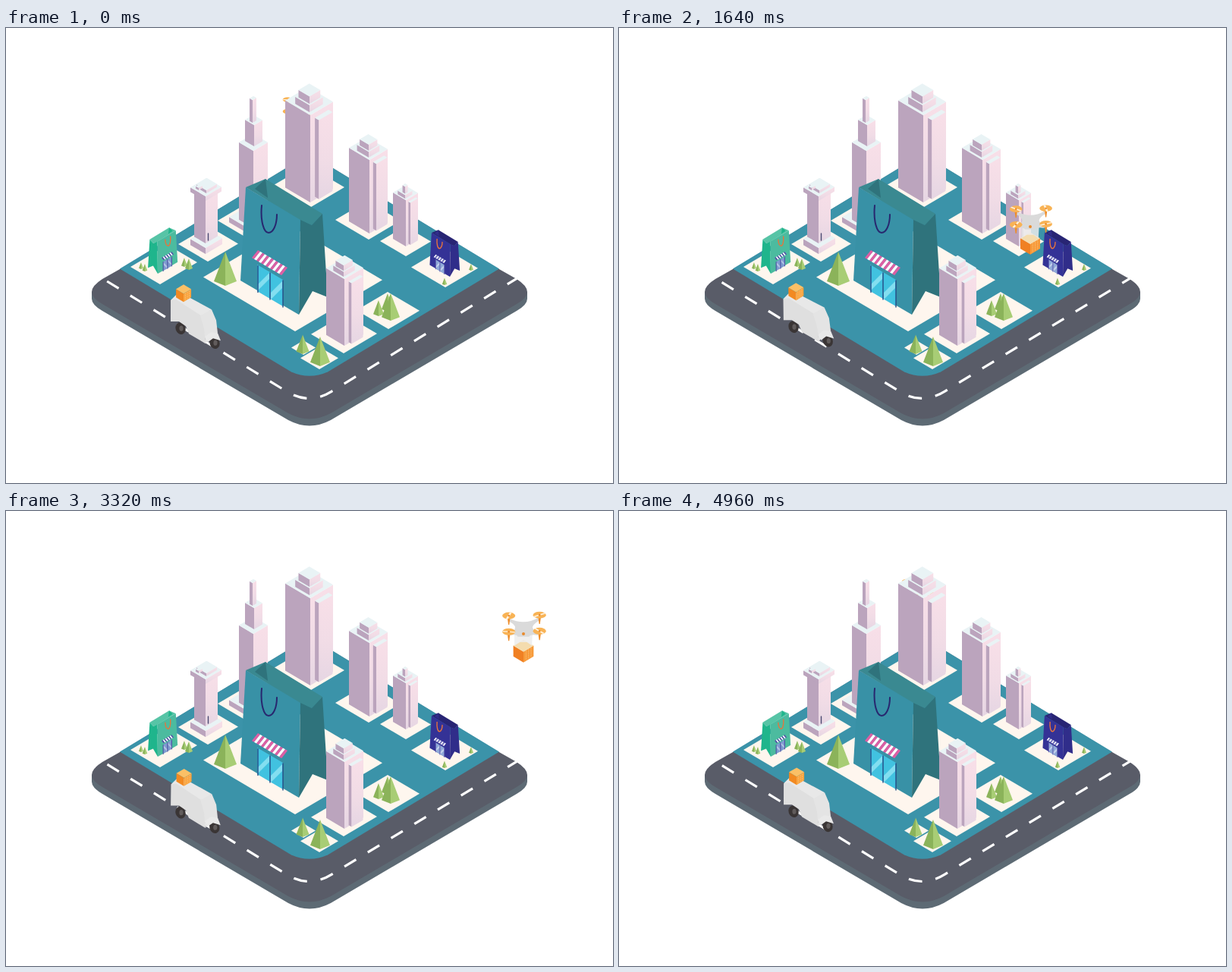
An HTML page for the animation above (5 s loop, 800 by 600 pixels).

```html
<!DOCTYPE html>
<html lang="en">
<head>
<meta charset="utf-8">
<title>Isometric city delivery</title>
<style>
  html, body { margin: 0; width: 100%; height: 100%; overflow: hidden; background: #fff; }
  svg { display: block; width: 100vw; height: 100vh; }
</style>
</head>
<body>
<svg id="stage" viewBox="0 0 800 600" xmlns="http://www.w3.org/2000/svg"></svg>
<script>
const LOOP = 5000, STEP = 40, SLOPE = 0.59, TURN = 2 * Math.PI;
const WALL = ['#e9f3f5', '#bba4bd', 'url(#wall)'];
const PARCEL = ['#fbc066', '#f28a22', '#f9a33d'];

const poly = (pts, fill) => `<polygon points="${pts}" fill="${fill}"/>`;
const line = (d, stroke, w) =>
  `<path d="${d}" fill="none" stroke="${stroke}" stroke-width="${w}" stroke-linecap="round"/>`;
const group = (id, ...parts) => `<g id="${id}">${parts.join('')}</g>`;

// Flat diamond; (x, y) is its front corner, l and r its reach to each side.
const diamond = (x, y, l, r, fill) => poly(
  `${x},${y} ${x - l},${y - l * SLOPE} ${x + r - l},${y - (l + r) * SLOPE} ${x + r},${y - r * SLOPE}`, fill);
const plot = (x, y, l, r) => diamond(x, y, l, r, '#fef6ee');

// Upright panel running from (x, y) to the side by w.
const panel = (x, y, w, h, fill) => poly(
  `${x},${y} ${x + w},${y - Math.abs(w) * SLOPE} ${x + w},${y - Math.abs(w) * SLOPE + h} ${x},${y + h}`, fill);

// Prism; (x, y) is the front corner of its top.
const box = (x, y, l, r, h, [top, left, right] = WALL) =>
  panel(x, y, -l, h, left) + panel(x, y, r, h, right) + diamond(x, y, l, r, top);

// Stepped tower with a raised fin on the right face.
function skyscraper(x, y, l, r, h, tip = 0.44) {
  const lift = 1.3 - 1.25 * tip;
  return box(x, y, l, r, h) +
    box(x - 1, y - 0.4 * l, 0.57 * l, 0.59 * r, 0.28 * l) +
    box(x - 1, y - lift * l, tip * l, tip * 1.08 * r, (lift - 0.4) * l * 0.85) +
    box(x + 0.38 * r, y + 0.22 * r, 0.16 * l, 0.6 * r, h - 0.33 * l);
}

function parcel(x, y, size, colors = PARCEL) {
  let out = box(x, y, size, size, size + 1, colors);
  for (let k = 0.25; k < 1; k += 0.25) {
    const px = x + k * size, py = y - k * size * SLOPE + 1;
    out += `<path d="M${px},${py}v${size - 1}" stroke="#fdc57c" stroke-width=".9" stroke-dasharray="1.6 1"/>`;
  }
  return out;
}

function tree(x, y, w) {
  const apex = `${x},${y - 3 * w}`, low = y - 0.4 * w;
  return poly(`${apex} ${x - w},${low} ${x},${y}`, '#8bb35a') +
    poly(`${apex} ${x},${y} ${x + w},${low}`, '#a8cd75');
}

// Awning of slanted stripes.
function awning(x, y, n, colors) {
  let out = '';
  for (let i = 0; i < n; i++) {
    const dx = 39 / n, dy = dx * SLOPE, ax = x + i * dx, ay = y + i * dy;
    const lean = k => `${ax + k * dx * 1.1 - 8},${ay + k * dy + 10}`;
    out += poly(`${ax},${ay} ${ax + dx},${ay + dy} ${lean(1)} ${lean(0.5)} ${lean(0)}`, colors[i % 2]);
  }
  return out;
}

// Shopping bag shop; (x, y) is its front bottom corner, a negative sx mirrors it.
function bag(x, y, sx, c) {
  const post = px => `M${px},${-65 + (px + 55) * SLOPE}v35`;
  return `<g transform="translate(${x} ${y}) scale(${sx} ${Math.abs(sx)})">` +
    poly('-70,-168 -44,-179 31,-133 17,-118 2,-124', c.inside) +
    poly('-58,-166 -44,-179 -41,-154', c.side) +
    poly('-70,-168 2,-125 0,0 -77,-45', c.front) +
    poly('2,-125 17,-118 31,-133 38,-23 18,-31 0,0', c.side) +
    line('M-49,-144C-51,-123 -46,-108 -40,-108C-34,-108 -29,-118 -29,-132', c.handle, c.stroke) +
    panel(-21, -46, -34, 35, c.glass) +
    poly('-54,-40 -39,-55 -39,-47 -54,-32', c.glare) +
    poly('-37,-29 -22,-44 -22,-35 -37,-20', c.glare) +
    line(post(-54) + post(-38) + post(-21), c.frame, c.stroke * 0.7) +
    awning(-54, -85, c.stripes.n, c.stripes.colors) + '</g>';
}

const defs = `<defs><linearGradient id="wall" x1="0" y1="0" x2="0" y2="1">
  <stop offset="0" stop-color="#f8dfe8"/><stop offset=".55" stop-color="#f1dce6"/><stop offset="1" stop-color="#e6d6e3"/>
</linearGradient></defs>`;

const ground = group('ground',
  `<path d="M113,348v9Q113,365 127,373L372,517Q400,532 428,517L673,373Q687,365 687,357v-9L400,330Z" fill="#5d6a74"/>`,
  `<path d="M150,318L127,331Q113,340 113,348Q113,356 127,364L372,508Q400,523 428,508L673,364Q687,356 687,348Q687,340 673,331L650,318L400,166Z" fill="#595c68"/>`,
  `<path d="M150,317.5L400,166L650,317.5L424,453.5Q400,464 376,453.5Z" fill="#3b93a9"/>`,
  `<path id="lane" d="M126,329.6L370,479.4Q399.5,497.6 429,479.3L676,328.6" fill="none" stroke="#fff" stroke-width="3.2" stroke-dasharray="18 18"/>`,
  plot(203, 338, 39, 49), plot(266, 308, 39, 40), plot(318, 277, 39, 50),
  plot(402, 236, 49, 44), plot(478, 279, 44, 42), plot(527, 301, 34, 33),
  plot(579, 342, 45, 43), plot(381, 400, 121, 115), plot(445, 429, 43, 44),
  plot(504, 397, 42, 41), plot(392, 431, 16, 16), plot(413, 450, 25, 25));

const spire = group('spire',
  box(314, 261, 20, 24, 7), box(326, 162, 19, 19, 102),
  box(327, 128, 12, 11, 28), box(325, 95, 4, 5, 30));

const hall = group('hall',
  box(263, 290, 20, 22, 8), box(263, 222, 15, 16, 62), line('M266.5,271v9', '#4b4a72', 1.4),
  box(263, 222, 20, 21, 6), box(264, 214, 13, 14, 4), box(254, 211, 4, 5, 3));

const tower = group('tower', skyscraper(401, 115, 33, 30, 115));

const blocks = group('blocks',
  skyscraper(479, 174, 27, 24, 97), skyscraper(527, 227, 17, 16, 61, 0.2));

const bags = group('bags',
  bag(386, 378, 1, {
    front: '#3891a6', side: '#2f737c', inside: '#3a8991', handle: '#28276f', stroke: 2,
    glass: '#41c2e0', glare: '#83def0', frame: '#254a85',
    stripes: { n: 13, colors: ['#dc5fa4', '#fff'] }
  }),
  bag(200, 324, -0.34, {
    front: '#4cbb9f', side: '#1fb58c', inside: '#57c4a6', handle: '#e7743c', stroke: 4,
    glass: '#7f9bd0', glare: '#b3c3e4', frame: '#45459a',
    stripes: { n: 9, colors: ['#5553a8', '#fff'] }
  }),
  bag(585, 328, 0.345, {
    front: '#343296', side: '#302d8a', inside: '#282574', handle: '#e7743c', stroke: 4,
    glass: '#8fa9d8', glare: '#c3d0ec', frame: '#5a58ac',
    stripes: { n: 9, colors: ['#fff', '#7a79c0'] }
  }));

const trees = group('trees',
  tree(289, 340, 15), tree(178, 318, 3), tree(183, 321, 3.3), tree(235, 315, 4), tree(241, 319, 5),
  tree(613, 320, 3), tree(578, 339, 3.2), tree(391, 430, 8.5), tree(414, 446, 13),
  tree(491, 380, 7), tree(503, 374, 8), tree(507, 386, 12));

const front = group('front', skyscraper(446, 331, 24, 25, 88));

const wheel = (x, y) =>
  `<ellipse cx="${x}" cy="${y}" rx="6.5" ry="8" transform="rotate(-20 ${x} ${y})" fill="#3a3535"/>` +
  `<ellipse cx="${x + 1}" cy="${y}" rx="2.6" ry="3.6" fill="#615c5c"/>`;
const truck = group('truck',
  wheel(230, 396), wheel(275, 415),
  poly('217,359 224,352 232,350 271,371 258,381', '#e8e8e8'),
  poly('217,359 224,358 257,379 262,396 263,416 241,403 237,393 228,387 217,387', '#dfdfdf'),
  poly('256,379 271,371 277,385 279,402 270,406 263,416 261,396', '#e4e4e4'),
  poly('262,407 270,401 279,402 283,412 273,409 266,414', '#e9e9e9'),
  parcel(234, 350, 10));

const rotor = (x, y) => `<g transform="translate(${x} ${y})">
  <path d="M-2,3L2,3L.6,13L-.6,13Z" fill="#ee8d2a"/>
  <g transform="scale(1 .52)"><circle r="9.3" fill="#f8b355"/>
  <path class="blade" d="M-9,0H9" stroke="#fff3e0" stroke-width="3"/></g>
  <circle r="1.5" fill="#ee8d2a"/></g>`;
const drone = group('drone',
  parcel(0, 25.5, 14.5, ['#f4dcae', '#f08023', '#f79a3a']),
  `<path d="M-13,-1H13L12,17L5,12H-5L-13,17Z" fill="#ececec" opacity=".85"/>`,
  `<path d="M-20,-22Q-10,-17 0,-17Q11,-17 21,-23L22,-19Q13,-13 13,-9Q15,-3 22,-1L20,2Q10,0 8,4H-8Q-10,0 -19,2L-20,-1Q-12,-4 -12,-9Q-12,-14 -21,-18Z" fill="#dadada"/>`,
  `<circle r="2.2" fill="#e88a2c"/>`,
  rotor(-21, -26), rotor(23, -27), rotor(-21, -3), rotor(23, -4));

const stage = document.getElementById('stage');
stage.innerHTML = defs + ground + spire + hall + tower + blocks + bags + trees + front + truck + drone;

const $ = id => document.getElementById(id);
const lane = $('lane'), truckEl = $('truck'), droneEl = $('drone'), towerEl = $('tower');
const blades = document.querySelectorAll('.blade');

// Waypoints of the flight: time, x, y.
const flight = [
  [0, 385, 112], [300, 341, 129], [600, 346, 197], [1120, 438, 259], [1640, 542, 262], [2100, 612, 251],
  [2600, 665, 275], [2960, 712, 240], [3320, 682, 162], [3960, 604, 96], [4480, 502, 97]
];

function waypoint(i) {
  const n = flight.length, [t, ...pos] = flight[(i + n) % n];
  return { t: t + Math.floor(i / n) * LOOP, pos };
}

// Smooth closed curve through the waypoints.
function flightAt(t) {
  const i = flight.findLastIndex(p => p[0] <= t);
  const [p, a, b, q] = [-1, 0, 1, 2].map(k => waypoint(i + k));
  const d = b.t - a.t, u = (t - a.t) / d, v = 1 - u;
  return a.pos.map((from, k) => {
    const to = b.pos[k];
    const ma = (to - p.pos[k]) / (b.t - p.t) * d;
    const mb = (q.pos[k] - from) / (q.t - a.t) * d;
    return v * v * ((1 + 2 * u) * from + u * ma) + u * u * ((1 + 2 * v) * to - v * mb);
  });
}

function draw(t) {
  lane.setAttribute('stroke-dashoffset', t * 0.13 - 8.4);

  const sway = -Math.cos((t - 1300) / LOOP * TURN);
  truckEl.setAttribute('transform', `translate(0 ${2 * sway}) rotate(${0.9 * sway} 230 396)`);

  const [x, y] = flightAt(t);
  const size = 0.83 - 0.16 * Math.cos((t - 50) / LOOP * TURN);
  droneEl.setAttribute('transform', `translate(${x} ${y}) scale(${size})`);
  blades.forEach((b, i) => b.setAttribute('transform', `rotate(${t * 0.9 + i * 40})`));
  const behind = t < 460 || t > 4200;
  stage.insertBefore(droneEl, behind ? towerEl : null);
}

let start = null;
function tick(now) {
  if (start === null) start = now;
  draw(Math.floor((now - start) % LOOP / STEP) * STEP);
  requestAnimationFrame(tick);
}
draw(0);
requestAnimationFrame(tick);
</script>
</body>
</html>
```
